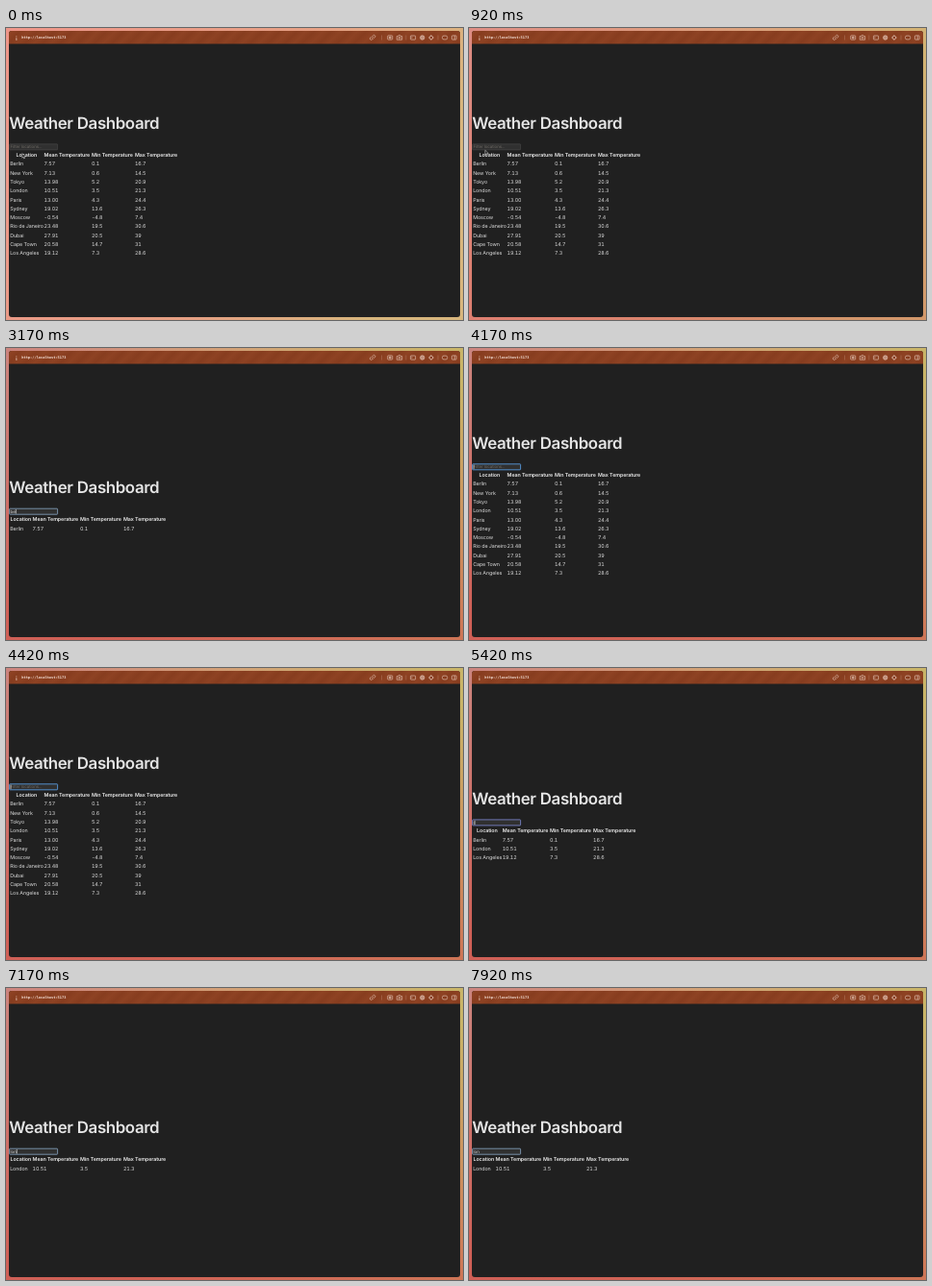
These frames come from a looping animation (475 px wide and 304 px high, 8000 ms). An HTML page:

```html
<!DOCTYPE html>
<html lang="en">
<head>
<meta charset="utf-8">
<title>Weather Dashboard</title>
<style>
  html, body { margin: 0; width: 100%; height: 100%; overflow: hidden; background: #202020; }
  svg { display: block; width: 475px; height: 304px; }
  text {
    font: 5.33px Inter, sans-serif; font-variant-numeric: tabular-nums; letter-spacing: -.08px;
    fill: #dedede; text-rendering: geometricPrecision; white-space: pre;
  }
  .title { font-size: 16.9px; font-weight: 600; letter-spacing: -.4px; fill: #e4e4e4; }
  .head { font-weight: 600; fill: #ececec; }
  .url { font: bold 3.65px "DejaVu Sans Mono", monospace; letter-spacing: 0; fill: #f6e3da; }
  .field { font-size: 4.44px; }
  .hint { fill: #6d6963; }
  .icons { fill: none; stroke: #e3c3b4; stroke-width: .65; }
  .icons .solid { fill: #e3c3b4; fill-opacity: .6; }
  .warm { animation: cool 8s linear infinite; }
  @keyframes cool { 0%, 1% { opacity: 1; } 24%, 99.9% { opacity: 0; } 100% { opacity: 1; } }
</style>
</head>
<body>
<svg viewBox="0 0 475 304">
  <defs>
    <linearGradient id="wall">
      <stop stop-color="#cb8b86"/><stop offset=".45" stop-color="#d2a078"/><stop offset="1" stop-color="#c9b568"/>
    </linearGradient>
    <linearGradient id="dusk" x1=".6" y1="0" x2=".3" y2="1">
      <stop stop-color="#d0584e" stop-opacity="0"/><stop offset="1" stop-color="#d0584e" stop-opacity=".85"/>
    </linearGradient>
    <linearGradient id="pink" x1="0" y1="0" x2="1" y2=".3">
      <stop stop-color="#ee9589"/><stop offset=".65" stop-color="#e5a083"/><stop offset="1" stop-color="#d8b67d"/>
    </linearGradient>
    <linearGradient id="bar" gradientUnits="userSpaceOnUse" x1="0" y1="0" x2="9" y2="9" spreadMethod="repeat">
      <stop stop-color="#873d1f"/><stop offset=".5" stop-color="#8e4223"/><stop offset="1" stop-color="#873d1f"/>
    </linearGradient>
  </defs>
  <rect width="475" height="304" fill="url(#wall)"/>
  <rect width="475" height="304" fill="url(#dusk)"/>
  <rect class="warm" width="475" height="304" fill="url(#pink)"/>
  <rect x="3" y="3" width="469" height="298" rx="3" fill="#202020"/>
  <path d="M3 16.5V6a3 3 0 0 1 3-3H469a3 3 0 0 1 3 3V16.5Z" fill="url(#bar)"/>
  <text class="url" x="16.3" y="11.4">http://localhost:5173</text>
  <g class="icons">
    <path d="M10.8 8.1v.8M10.8 9.6v2.6M10 12.2h1.6"/>
    <path d="M380.2 10.8l1.8-1.8M380.5 8.8l1-1a1.3 1.3 0 0 1 1.9 1.9l-1 1M381.6 11l-1 1a1.3 1.3 0 0 1-1.9-1.9l1-1"/>
    <path d="M390.5 7.5v5M415.8 7.5v5M449 7.5v5" opacity=".35"/>
    <rect x="396.7" y="7.9" width="5" height="4.2" rx=".6"/>
    <circle class="solid" cx="399.2" cy="10" r="1"/>
    <path d="M406.2 8.5h1.2l.5-.8h2l.5.8h1.2v3.7h-5.4z"/>
    <circle cx="408.9" cy="10.2" r="1"/>
    <rect x="420.4" y="8" width="5.2" height="4.1" rx=".6"/>
    <path d="M421.4 9.1l.9.8-.9.8"/>
    <circle class="solid" cx="432.7" cy="10" r="2.2"/>
    <circle cx="441.9" cy="10" r="1.8"/>
    <path d="M441.9 7.2v1.6M441.9 11.2v1.6M439.1 10h1.6M443.1 10h1.6"/>
    <rect x="453.5" y="8.1" width="5.2" height="3.8" rx="1.5"/>
    <rect x="463.4" y="7.9" width="4.7" height="4.2" rx=".7"/><path d="M466.2 8v4"/>
  </g>
  <g id="page">
    <text class="title" x="3.2" y="105">Weather Dashboard</text>
    <rect id="box" x="3.6" y="120.8" width="50" height="6" rx=".6" fill="#303030"/>
    <text id="value" class="field" x="4.6" y="125.4"></text>
    <rect id="caret" y="121.6" width=".6" height="4.5" fill="#fff"/>
    <g id="table"></g>
  </g>
  <path id="pointer" d="M0 0V4.6L1.1 3.6 1.9 5.4 2.7 5 1.9 3.3H3.4Z" fill="#111" stroke="#eee" stroke-width=".5"/>
</svg>
<script>
const LOOP = 8000, ROW = 9.28, FOCUS = 1600, HIDE_POINTER = 2600;
const $ = id => document.getElementById(id);

const cities = `Berlin,7.57,0.1,16.7
New York,7.13,0.6,14.5
Tokyo,13.98,5.2,20.9
London,10.51,3.5,21.3
Paris,13.00,4.3,24.4
Sydney,19.02,13.6,26.3
Moscow,-0.54,-4.8,7.4
Rio de Janeiro,23.48,19.5,30.6
Dubai,27.91,20.5,39
Cape Town,20.58,14.7,31
Los Angeles,19.12,7.3,28.6`.split("\n").map(line => line.split(","));

const BLUE = "#5799dc";
const steps = [
  { at: 0, query: "", ring: "#505050" },
  { at: FOCUS, query: "", ring: BLUE },
  { at: 2650, query: "b", ring: BLUE },
  { at: 2920, query: "be", ring: "#7f9ab5" },
  { at: 3760, query: "b", ring: BLUE },
  { at: 3960, query: "", ring: BLUE },
  { at: 5240, query: "l", ring: "#7882c4" },
  { at: 6150, query: "lo", ring: BLUE },
  { at: 7100, query: "lon", ring: "#7f9ab5" }
];

const label = (x, y, str, attrs = "") => `<text x="${x}" y="${y}" ${attrs}>${str}</text>`;

function tableMarkup(rows) {
  const names = rows.map(row => row[0]);
  const second = names.includes("Rio de Janeiro") ? 39.6 : names.includes("Los Angeles") ? 34.7 : 27.6;
  const columns = [4.2, second, second + 49.4, second + 94.4];
  const heads = ["Mean", "Min", "Max"].map((kind, i) =>
    label(columns[i + 1], 134, kind + " Temperature", 'class="head"'));
  const cells = rows.flatMap((row, r) =>
    row.map((cell, c) => label(columns[c], 143.4 + r * ROW, cell)));
  return label((second + 3) / 2, 134, "Location", 'class="head" text-anchor="middle"')
    + heads.join("") + cells.join("");
}

let shown;
function show(step) {
  shown = step;
  const { query, ring, at } = step;
  const rows = cities.filter(([name]) => name.toLowerCase().includes(query));
  $("table").innerHTML = tableMarkup(rows);
  $("page").setAttribute("transform", `translate(0 ${(cities.length - rows.length) * ROW / 2})`);
  $("box").setAttribute("stroke", ring);
  $("box").setAttribute("stroke-width", at >= FOCUS ? .9 : .5);
  $("value").textContent = query || "Filter locations...";
  $("value").classList.toggle("hint", !query);
  const width = query ? $("value").getComputedTextLength() : 0;
  $("caret").setAttribute("x", 4.7 + width);
}

function frame() {
  const t = performance.now() % LOOP;
  const step = steps.findLast(s => s.at <= t);
  if (step !== shown) show(step);
  const blinkOn = (t - step.at) % 1000 < 500;
  $("caret").style.opacity = t >= FOCUS && blinkOn ? 1 : 0;
  const p = Math.min(1, Math.max(0, (t - 400) / 1000));
  const ease = p * p * (3 - 2 * p);
  $("pointer").setAttribute("transform", `translate(16.8 ${130.6 - 6.3 * ease})`);
  $("pointer").style.opacity = t < HIDE_POINTER ? 1 : 0;
  requestAnimationFrame(frame);
}
frame();
</script>
</body>
</html>
```
